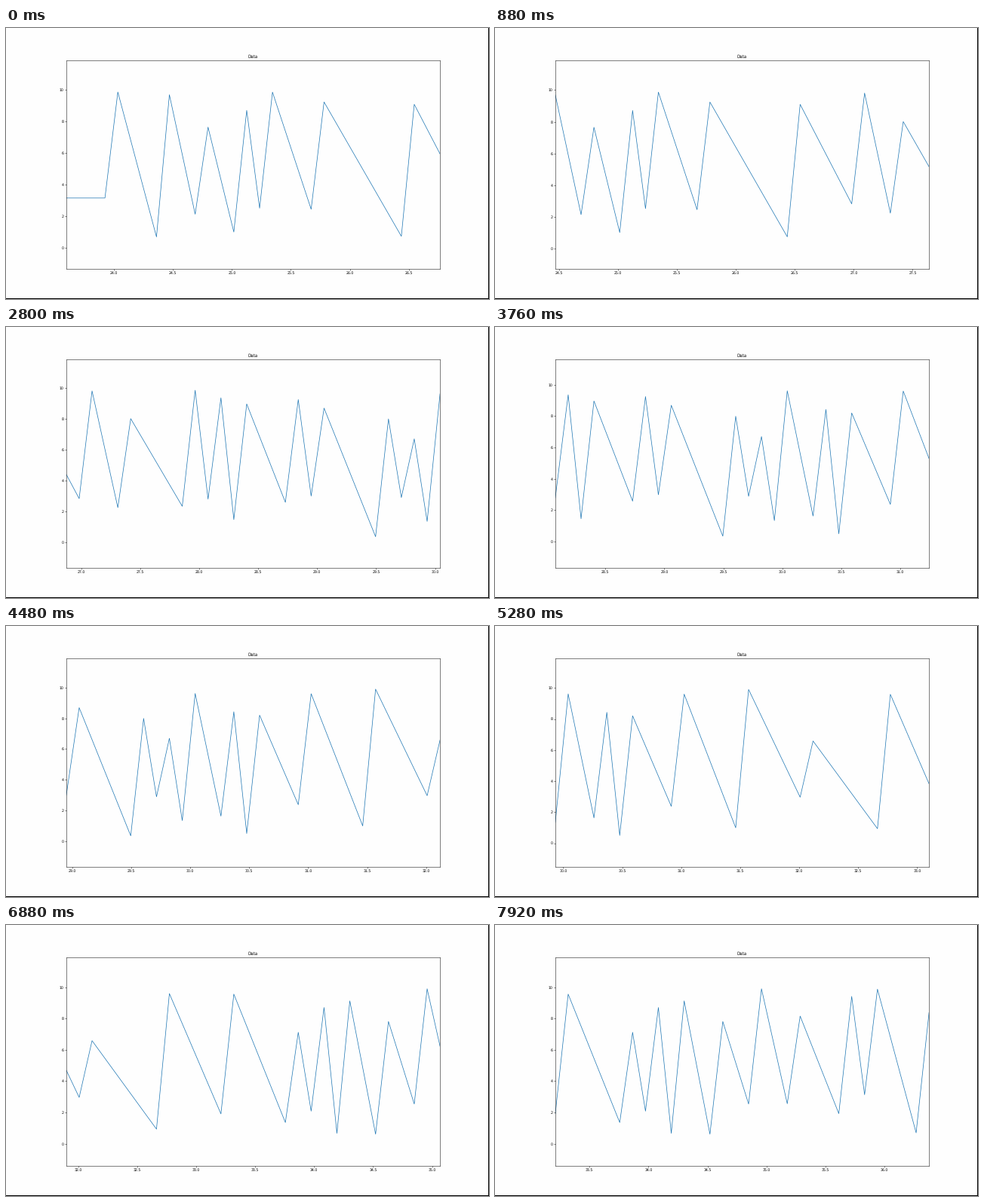
These frames come from a looping animation (640 by 360 pixels, 8000 ms). A matplotlib script:

```python
import numpy as np
import matplotlib.pyplot as plt
from matplotlib.animation import FuncAnimation
from matplotlib.patches import Rectangle

W, H = 640, 360
FRAMES, INTERVAL = 100, 80
WINDOW, SAMPLES = 30, 118
START, STEP = 23.596, 0.10925
BACK = "#fefefe"

# Sawtooth-like noise: each peak rises sharply from a low one sample earlier,
# then falls slowly towards the next low
PEAKS = np.array([4, 8, 11, 14, 16, 20, 27, 32, 35, 40, 42, 44, 48, 50, 55, 57, 59,
                  62, 64, 68, 73, 78, 84, 89, 94, 96, 98, 101, 104, 107, 111, 113, 117])


def make_feed(seed=3):
    rng = np.random.default_rng(seed)
    n = len(PEAKS)
    highs = 9.9 - 3.5 * rng.random(n) ** 2
    lows = 3.4 * rng.random(n)
    turns = np.column_stack([PEAKS - 1, PEAKS]).ravel()
    levels = np.column_stack([lows, highs]).ravel()
    index = np.arange(SAMPLES)
    return START + STEP * index, np.interp(index, turns, levels)


def first_sample(frame):
    """Eleven samples arrive every twelve frames, after a short wait."""
    return max(0, 11 * frame // 12 - 2)


times, values = make_feed()

plt.rcParams.update({
    "font.family": "DejaVu Sans",
    "text.hinting": "none",
    "axes.linewidth": 0.9,
    "axes.titlesize": 10,
    "axes.titlepad": 5,
})
for axis in ("xtick", "ytick"):
    plt.rcParams.update({
        f"{axis}.labelsize": 8.33,
        f"{axis}.major.size": 2.9,
        f"{axis}.major.pad": 2.9,
        f"{axis}.major.width": 0.9,
    })

fig = plt.figure(figsize=(16, 9), dpi=40, facecolor=BACK)

# The plot fills all but the last pixel column and row, which stay dark
sx, sy = (W - 1) / W, (H - 1) / H
ax = fig.add_axes([0.125 * sx, 1 / H + 0.11 * sy, 0.775 * sx, 0.77 * sy],
                  facecolor=BACK)
ax.set_title("Data")
line, = ax.plot([], [], color="#1f77b4", lw=1.3)
fig.add_artist(Rectangle((0, 0), 1, 1 / H, fc="black", lw=0))
fig.add_artist(Rectangle((sx, 0), 1 / W, 1, fc="black", lw=0))


def update(frame):
    first = first_sample(frame)
    x, y = times[first:first + WINDOW], values[first:first + WINDOW]
    line.set_data(x, y)
    ax.set_xlim(x[0], x[-1])
    ax.set_ylim(y.min() - 2, y.max() + 2)
    return line,


anim = FuncAnimation(fig, update, frames=FRAMES, interval=INTERVAL,
                     repeat=True, repeat_delay=0)
plt.show()
```
